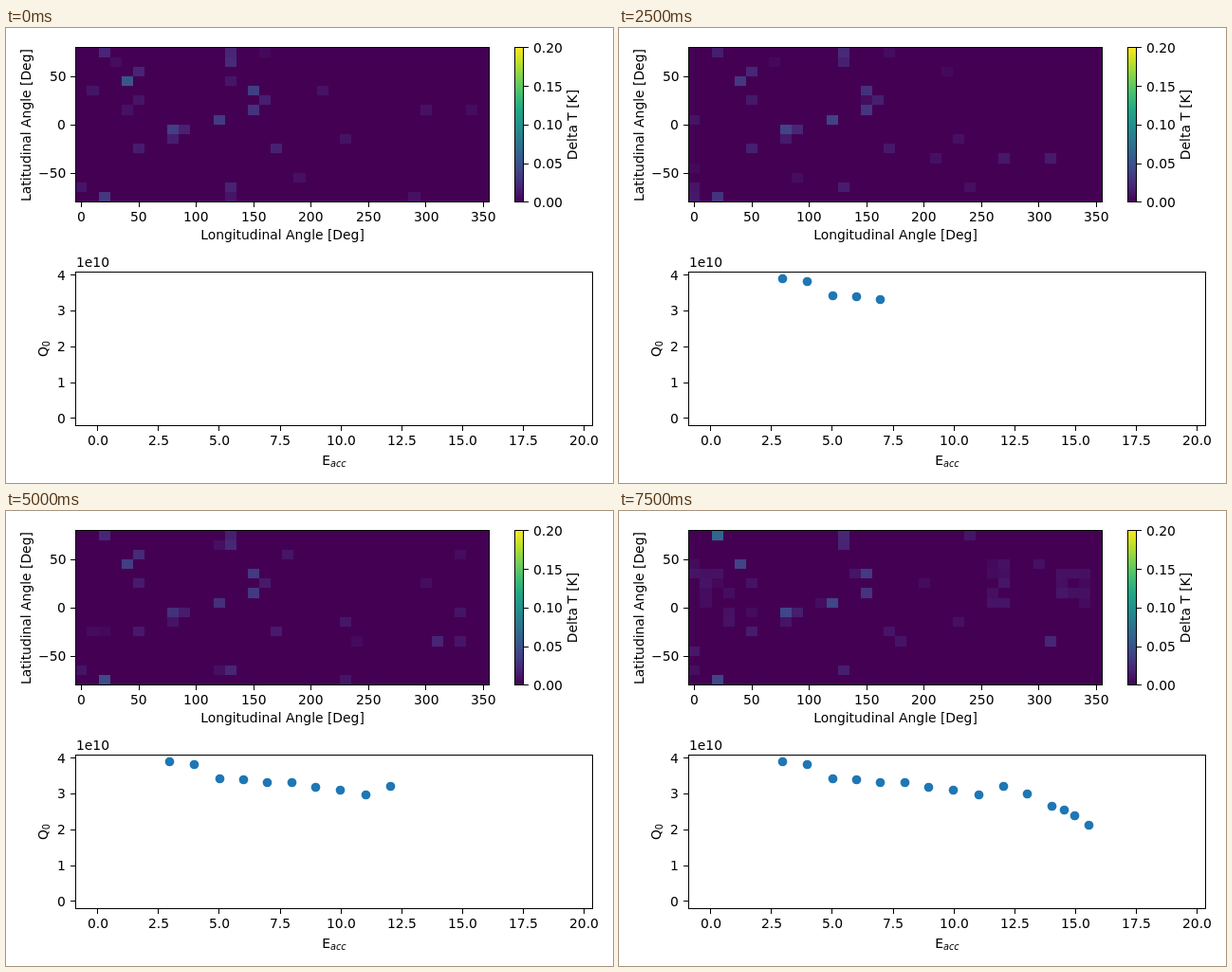
Recreate the animation shown at these times as an HTML page. Size 640 by 480 pixels, loop 8000 ms.

```html
<!DOCTYPE html>
<html>
<head>
<meta charset="utf-8">
<style>
html, body { margin: 0; width: 100%; height: 100%; overflow: hidden; background: #fff; }
svg { display: block; font: 13.89px "DejaVu Sans", sans-serif; }
.sub { font-size: 9.72px; }
</style>
</head>
<body>
<svg id="stage" width="640" height="480" viewBox="0 0 640 480">
  <defs><linearGradient id="scale" x1="0" y1="1" x2="0" y2="0"></linearGradient></defs>
  <rect x="73" y="20" width="437" height="164" fill="#440154"/>
  <g id="heat" shape-rendering="crispEdges"></g>
  <rect x="536" y="20" width="10" height="164" fill="url(#scale)"/>
  <g id="axes" fill="none" stroke="#000">
    <rect x="73.5" y="20.5" width="436" height="163"/>
    <rect x="536.5" y="20.5" width="9" height="163"/>
    <rect x="73.5" y="257.5" width="545" height="162"/>
  </g>
  <g id="labels">
    <text x="291.5" y="223" text-anchor="middle">Longitudinal Angle [Deg]</text>
    <text transform="translate(26 102.5) rotate(-90)" text-anchor="middle">Latitudinal Angle [Deg]</text>
    <text transform="translate(602 102) rotate(-90)" text-anchor="middle">Delta T [K]</text>
    <text x="74" y="252">1e10</text>
    <text x="346" y="461" text-anchor="middle">E<tspan class="sub" dy="2" font-style="italic">acc</tspan></text>
    <text transform="translate(44 338.5) rotate(-90)" text-anchor="middle">Q<tspan class="sub" dy="2">0</tspan></text>
  </g>
  <g id="dots" fill="#1f77b4"></g>
</svg>
<script>
const $ = id => document.getElementById(id);
const STEP = 500, STEPS = 16, COLS = 36, ROWS = 16;

function add(parent, tag, attrs, text) {
  const el = document.createElementNS("http://www.w3.org/2000/svg", tag);
  for (const k in attrs) el.setAttribute(k, attrs[k]);
  if (text) el.textContent = text;
  parent.append(el);
  return el;
}

// Colour scale, 0 to 0.2 K
const stops = ["440154", "482475", "414487", "355f8d", "2a788e", "21918c",
  "22a884", "44bf70", "7ad151", "bddf26", "fde725"]
  .map(h => [0, 2, 4].map(i => parseInt(h.slice(i, i + 2), 16)));
function colour(level) {
  const v = Math.min(level / 0.02, 9.999), i = Math.floor(v);
  return `rgb(${stops[i].map((c, k) => Math.round(c + (stops[i + 1][k] - c) * (v - i)))})`;
}
stops.forEach((c, i) => add($("scale"), "stop", { offset: i / 10, "stop-color": `rgb(${c})` }));

// Ticks, and labels whose left edge sits on a whole pixel; align: 0 start, 0.5 middle, 1 end
const snap = v => Math.floor(v) + 0.5;
function label(text, x, y, align) {
  const el = add($("labels"), "text", { y: Math.round(y) }, text.replace("-", "\u2212"));
  el.setAttribute("x", Math.round(x - el.getComputedTextLength() * align));
}
function tickX(x, y, text) {
  add($("axes"), "path", { d: `M${snap(x)} ${y}v5` });
  label(text, x, y + 20, 0.5);
}
function tickY(x, y, text, dir = -1) {
  add($("axes"), "path", { d: `M${x} ${snap(y)}h${dir * 5}` });
  label(text, x + dir * 9.7, y + 5.06, dir < 0 ? 1 : 0);
}
for (let lon = 0; lon <= 350; lon += 50) tickX(79.5 + lon * 1.211, 184, String(lon));
for (let lat = -50; lat <= 50; lat += 50) tickY(73, 102.1 - lat * 1.018, String(lat));
for (let i = 0; i <= 4; i++) tickY(546, 183.8 - i * 40.75, (i * 0.05).toFixed(2), 1);
for (let e = 0; e <= 20; e += 2.5) tickX(96.65 + e * 25.65, 420, e.toFixed(1));
for (let q = 0; q <= 4; q++) tickY(73, 411.9 - q * 37.85, String(q));

// Measured points, one more at each step
const dots = [[172.5, 264.5], [198.5, 267.5], [225.5, 282.5], [250.5, 283.5], [275.5, 286.5],
  [301.5, 286.5], [326.5, 291.5], [352.5, 294.5], [379.5, 299.5], [405.5, 290.5], [430.5, 298.5],
  [456.5, 311.5], [469.5, 315.5], [480.5, 321.5], [495.5, 331.5]]
  .map(([cx, cy]) => add($("dots"), "circle", { cx, cy, r: 4.86 }));

// Places that stay warm: longitude, latitude, mean level
const sites = [[40, 45, .045], [150, 15, .03], [150, 35, .03], [120, 5, .035], [80, -5, .035],
  [20, -75, .04], [20, 75, .02], [130, 75, .02], [130, 65, .022], [50, 55, .025], [90, -5, .018],
  [130, -65, .018], [310, -35, .018], [170, -25, .016], [50, -25, .016], [50, 25, .014],
  [160, 25, .015], [80, -15, .014], [230, -15, .011], [0, -65, .01]];

// Single bright flashes by step
const flashes = { 3: [40, -65, .09], 6: [20, 75, .108], 8: [100, -15, .145], 15: [20, 75, .065] };

// Patches that warm up late: west, south, columns, rows
const patches = [[0, 15, 4, 4], [260, 5, 2, 5], [320, 5, 3, 4]];

function random(seed) {
  const next = () => (seed = (seed * 16807) % 2147483647) / 2147483647;
  next();
  return next;
}

function cellsAt(step) {
  const rnd = random(step * 7919 + 4321), cells = new Map();
  const put = (lon, lat, level) => cells.set(lon + "," + lat, { lon, lat, level });
  for (let i = 0; i < 12; i++)
    put(10 * Math.floor(rnd() * COLS), 75 - 10 * Math.floor(rnd() * ROWS), .004 + rnd() * .009);
  const spread = Math.max(0, step - 12) * .22;
  for (const [west, south, cols, rows] of patches)
    for (let i = 0; i < cols * rows; i++)
      if (rnd() < spread) put(west + i % cols * 10, south + Math.floor(i / cols) * 10, .004 + rnd() * .008);
  for (const [lon, lat, level] of sites)
    if (rnd() < .7 + level * 10) put(lon, lat, level * (.7 + rnd() * .5));
  if (flashes[step]) put(...flashes[step]);
  return cells.values();
}

const edgeX = col => Math.round(73.3 + col * 12.11);
const edgeY = row => Math.round(20.4 + row * 10.18);
function drawHeat(step) {
  $("heat").replaceChildren();
  for (const { lon, lat, level } of cellsAt(step)) {
    const col = lon / 10, row = (75 - lat) / 10, x = edgeX(col), y = edgeY(row);
    add($("heat"), "rect", {
      x, y, width: edgeX(col + 1) - x, height: edgeY(row + 1) - y, fill: colour(level)
    });
  }
}

let shown = -1;
function frame() {
  const step = Math.floor(performance.now() / STEP) % STEPS;
  if (step !== shown) {
    shown = step;
    drawHeat(step);
    dots.forEach((dot, i) => dot.setAttribute("visibility", i < step ? "visible" : "hidden"));
  }
  requestAnimationFrame(frame);
}
frame();
</script>
</body>
</html>
```
